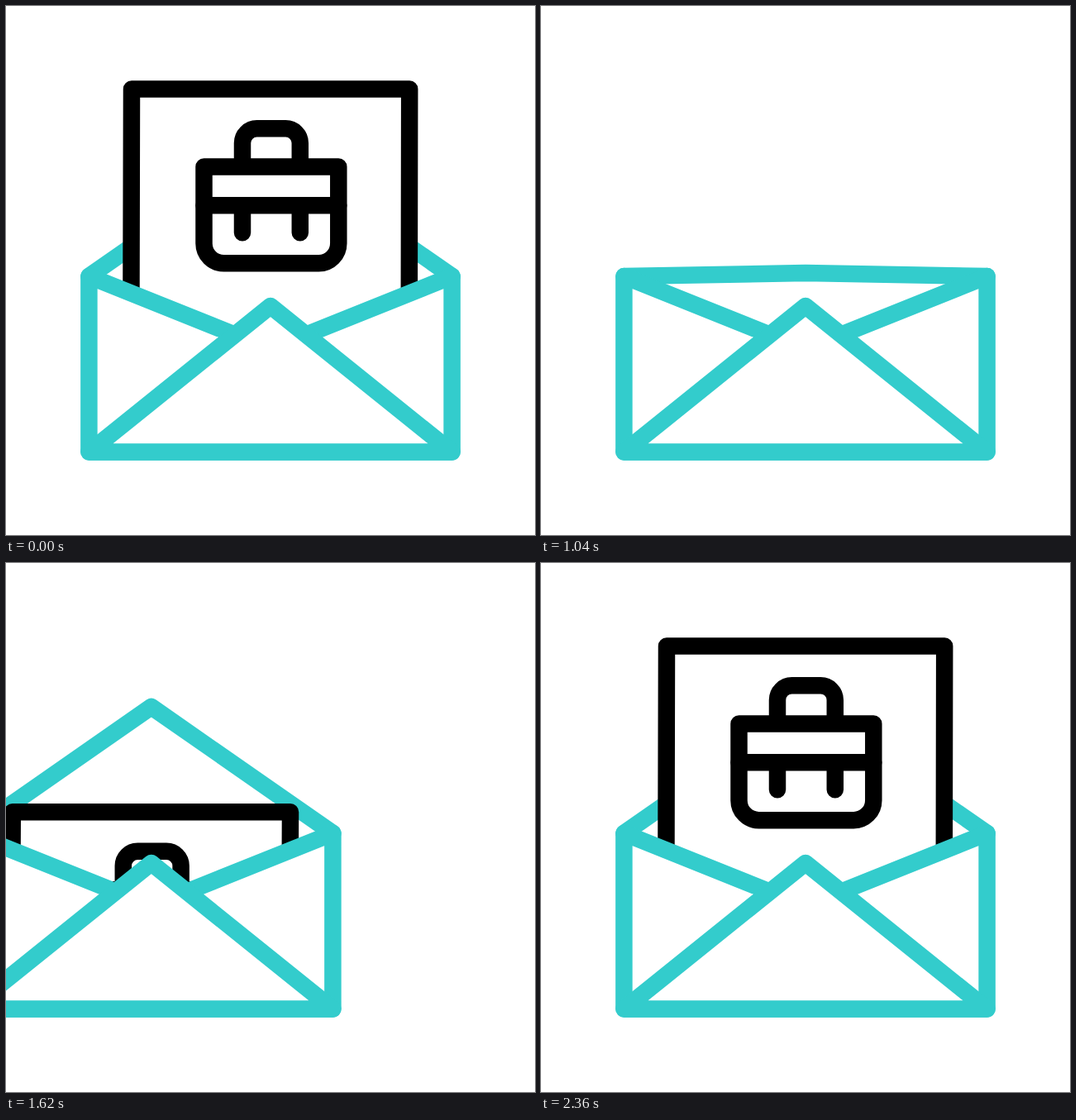
An HTML page for the animation above (2700 ms loop, 640 by 640 pixels).

```html
<!DOCTYPE html>
<html lang="en">
<head>
<meta charset="utf-8">
<title>Job letter</title>
<style>
  html, body { margin: 0; width: 100%; height: 100%; overflow: hidden; background: #fff; }
  svg { display: block; width: 100%; height: 100%; }
  path { fill: #fff; stroke-width: 20.5; stroke-linecap: round; stroke-linejoin: round; }
  .teal { stroke: #3cc; }
  .ink { stroke: #000; }
</style>
</head>
<body>
<svg viewBox="0 0 640 640">
  <clipPath id="pocket"><rect width="640" height="400"/></clipPath>
  <g id="streaks" class="ink"></g>
  <g id="envelope">
    <path id="backFlap" class="teal"/>
    <g clip-path="url(#pocket)" class="ink">
      <path id="paper"/>
      <g id="briefcase">
        <path d="M286 194.6V165.8a17.5 17.5 0 0 1 17.5-17.5H338.3a17.5 17.5 0 0 1 17.5 17.5V194.6"/>
        <path d="M239.5 194.6H402.3V287.2a24 24 0 0 1-24 24H263.5a24 24 0 0 1-24-24Z"/>
        <path d="M239.5 241.3H402.3M286 241.3V274.2M355.8 241.3V274.2"/>
      </g>
    </g>
    <g class="teal">
      <path d="M100.4 327L320 415L539.6 327V539.6H100.4Z"/>
      <path d="M100.4 539.6L320 363L539.6 539.6Z"/>
      <path id="frontFlap" style="stroke-linejoin:bevel"/>
    </g>
  </g>
</svg>
<script>
const LOOP = 2700, WRAP = 1424, TRAVEL = 1338;
const RAISED = -48.7, HIDDEN = 300;
const [streaks, envelope, backFlap, paper, briefcase, frontFlap] =
  ['streaks', 'envelope', 'backFlap', 'paper', 'briefcase', 'frontFlap']
    .map(id => document.getElementById(id));

// start x, y, full length
const streakLines = [[79.3, 348.2, 150], [200.5, 432.6, 112], [58.5, 512, 160]];

function ease(t, from, to) {
  const u = Math.min(1, Math.max(0, (t - from) / (to - from)));
  return u * u * (3 - 2 * u);
}
const mix = (a, b, k) => a + (b - a) * k;
const flapPath = tip => `M100.4 327L320 ${tip}L539.6 327`;

function paperOffset(t) {
  if (t < 560) return mix(0, RAISED, ease(t, 0, 560));
  if (t < WRAP) return mix(RAISED, HIDDEN, ease(t, 560, 1040));
  if (t < 1880) return mix(HIDDEN, RAISED, ease(t, 1480, 1880));
  return mix(RAISED, 0, ease(t, 1880, 2370));
}

function draw(t) {
  // leaves on the right, comes back from the left
  const shift = TRAVEL * (ease(t, 1090, 1757) - (t < WRAP ? 0 : 1));
  envelope.setAttribute('transform', `translate(${shift} 0)`);

  const y = paperOffset(t), top = 100.6 + y;
  paper.setAttribute('d', `M151.3 420L152 ${top}H488.2L487.7 420`);
  briefcase.setAttribute('transform', `translate(0 ${y})`);

  const closing = t < WRAP ? ease(t, 800, 1065) : 0;
  backFlap.setAttribute('d', flapPath(mix(174, 326.5, closing)));
  frontFlap.setAttribute('d', t > 1062 && t < WRAP
    ? flapPath(mix(327, 418.5, ease(t, 1060, 1220))) : '');

  const head = ease(t, 1120, 1400), tail = ease(t, 1200, 1480);
  streaks.innerHTML = head > tail ? streakLines.map(([x, y, length]) =>
    `<path d="M${x + length * tail} ${y}H${x + length * head}"/>`).join('') : '';
}

function tick() {
  draw(performance.now() % LOOP);
  requestAnimationFrame(tick);
}
tick();
</script>
</body>
</html>
```
